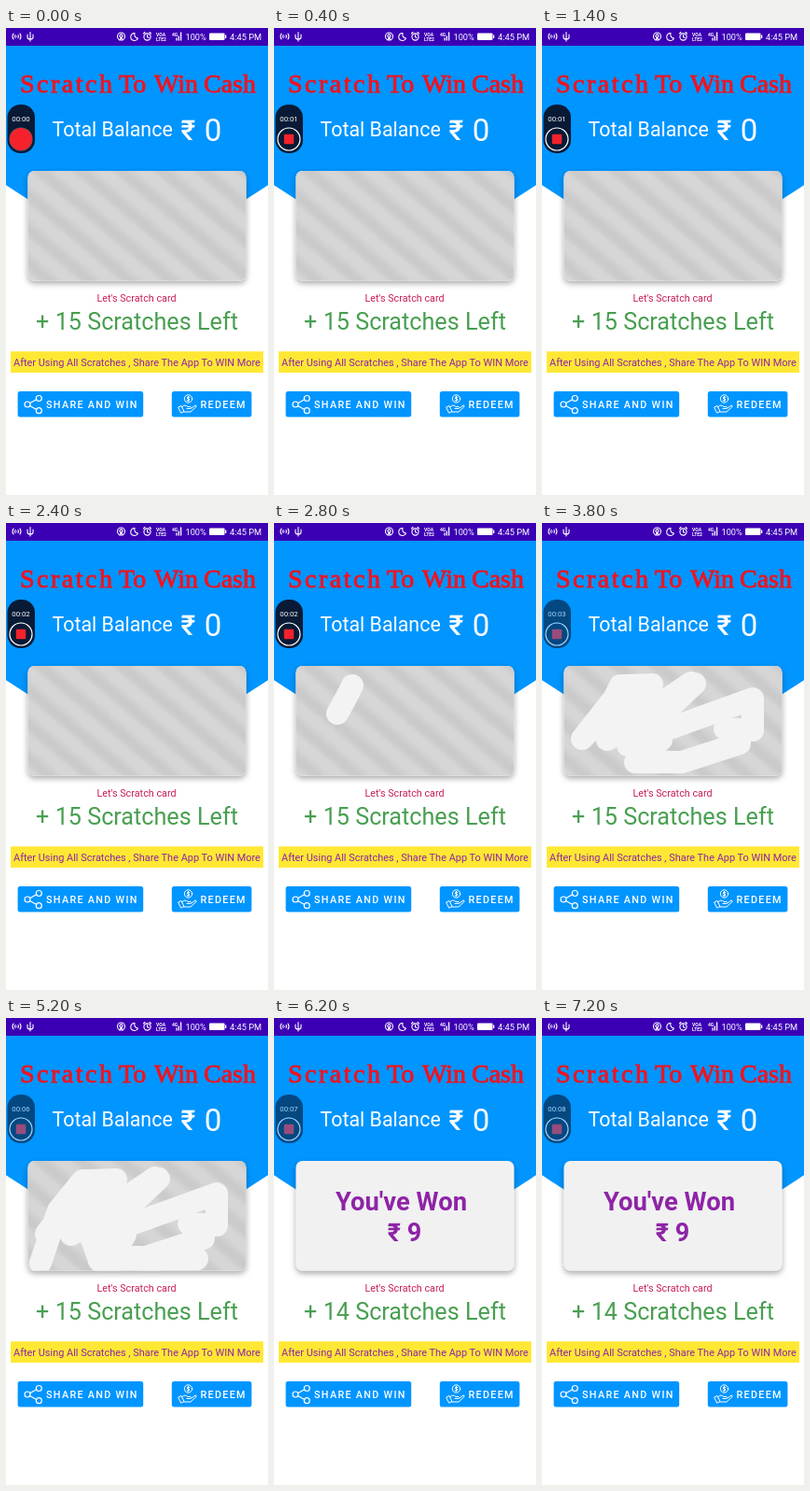
An HTML page that plays this animation: 281 px wide and 500 px high, repeating every 8 s.

```html
<!DOCTYPE html>
<html lang="en">
<head>
<meta charset="utf-8">
<style>
  html, body { margin: 0; width: 100%; height: 100%; overflow: hidden; background: #fff; }
  svg { display: block; width: 100vw; height: 100vh; font-family: Roboto, "Noto Sans", sans-serif; }
  .line { fill: none; stroke: #fff; stroke-linecap: round; stroke-linejoin: round; }
  .mid { text-anchor: middle; }
  .title { font: 28px "Liberation Serif", serif; fill: #f3121d; stroke: #f3121d; stroke-width: .8; }
  .button { font-size: 10.8px; font-weight: 500; letter-spacing: 1.3px; fill: #fff; }
</style>
</head>
<body>
<svg viewBox="0 0 281 500">
  <defs>
    <linearGradient id="sheen" x2="0" y2="1">
      <stop offset="0" stop-color="#d6d6d6"/>
      <stop offset=".3" stop-color="#d6d6d6"/>
      <stop offset=".6" stop-color="#cacaca"/>
      <stop offset=".8" stop-color="#cbcbcb"/>
      <stop offset="1" stop-color="#d6d6d6"/>
    </linearGradient>
    <pattern id="silver" width="40" height="28" patternUnits="userSpaceOnUse" patternTransform="translate(23 153) rotate(40)">
      <rect width="40" height="28" fill="url(#sheen)"/>
    </pattern>
    <clipPath id="cardClip"><rect x="23.500" y="153" width="234" height="117.500" rx="7"/></clipPath>
    <filter id="shadow" x="-10%" y="-10%" width="120%" height="130%">
      <feDropShadow dx="0" dy="3" stdDeviation="3" flood-opacity=".34"/>
    </filter>
  </defs>

  <rect width="281" height="500" fill="#fff"/>
  <path d="M0 19H281V168.300L140.500 259L0 168.300Z" fill="#0095ff"/>
  <rect width="281" height="19" fill="#3c00b4"/>

  <!-- status bar -->
  <g class="line" stroke-width="1.100">
    <path d="M8 6q-2 3 0 6M15 6q2 3 0 6M10 7.500q-1 1.500 0 3M13 7.500q1 1.500 0 3M11.500 9v.1"/>
    <path d="M26 4.500V14M23 7v3q0 2 3 2t3-2V7"/>
    <circle cx="123.500" cy="9" r="4"/><circle cx="123.500" cy="8.500" r="1.600"/><path d="M122 13l1.500-3 1.500 3"/>
    <path d="M138 5.500a4 4 0 1 0 3.500 5.500a4 4 0 0 1-3.500-5.500Z"/>
    <circle cx="151.500" cy="9.500" r="3.600"/><path d="M151.500 7.500v2l1.500 1M147.500 6l1.500-1.500M155.500 6L154 4.500"/>
    <path d="M183 13v-2M185.300 13V9M187.600 13V5" stroke-width="1.300"/>
  </g>
  <g fill="#fff">
    <g font-size="5" font-weight="700"><text x="161" y="8.500">VOA</text><text x="161" y="13.500">LTE2</text><text x="178" y="8.500">4G</text></g>
    <text x="192.500" y="12.700" font-size="9.200">100%</text>
    <rect x="218" y="5.500" width="16.500" height="7.500" rx="1"/><rect x="235" y="7.500" width="1.300" height="3.500"/>
    <text x="240" y="12.700" font-size="9.250">4:45 PM</text>
  </g>

  <!-- header -->
  <text class="title" y="68.500"><tspan x="15" letter-spacing="2.500">Scratch</tspan> <tspan x="121">To</tspan> <tspan x="159">Win</tspan> <tspan x="212">Cash</tspan></text>
  <g fill="#fff">
    <text x="49.500" y="116" font-size="21.400">Total Balance</text>
    <text x="187.500" y="120" font-size="30" font-weight="500">₹</text>
    <text x="212.700" y="120.500" font-size="33">0</text>
  </g>

  <!-- scratch card -->
  <rect x="23.500" y="153" width="234" height="117.500" rx="7" fill="#f1f1f2" filter="url(#shadow)"/>
  <g id="cover" clip-path="url(#cardClip)">
    <rect x="23" y="153" width="235" height="118" fill="url(#silver)"/>
    <polyline id="scratch" class="line" style="stroke:#f3f3f3;stroke-width:24"/>
  </g>
  <g id="prize" class="mid" fill="#8e24a6" font-weight="700">
    <text x="136.500" y="206" font-size="27.400">You've Won</text>
    <text x="140" y="239" font-size="27">₹ 9</text>
  </g>

  <text class="mid" x="140" y="293" font-size="10.800" fill="#c81e5b">Let's Scratch card</text>
  <text class="mid" id="left" x="140.500" y="323" font-size="25.200" fill="#489f50"></text>
  <rect x="5" y="346.300" width="271" height="22.700" fill="#ffe834"/>
  <text x="8" y="361.500" font-size="10.950" fill="#8e24a6">After Using All Scratches , Share The App To WIN More</text>

  <!-- buttons -->
  <g fill="#0095ff">
    <rect x="12.600" y="389" width="134.600" height="27.600" rx="2.500"/>
    <rect x="177.800" y="389" width="85.600" height="27.600" rx="2.500"/>
  </g>
  <g class="line" stroke-width="1.200">
    <path d="M25.500 401.800l7.200-4M25.500 404.500l7.200 4"/>
    <circle cx="23" cy="403" r="3"/><circle cx="35.300" cy="396.500" r="3"/><circle cx="35.300" cy="409.700" r="3"/>
  </g>
  <g class="line" stroke-width="1">
    <circle cx="195.500" cy="397" r="4.200"/>
    <path d="M197 395.500q-1.500-1-2.500 0t1 1.500t1 1.800t-2.500 0M195.500 394.300v5.400"/>
    <path d="M185 406l3-1.500 3 6-3 1.500ZM189 405.500q3-3 6 0h3q1.500 1 0 2h-4M199 407l4-3q1.500 0 1 1.500l-6 5.500h-7"/>
  </g>
  <g class="button"><text x="43" y="407">SHARE AND WIN</text><text x="208.500" y="407">REDEEM</text></g>

  <!-- recorder -->
  <g id="recorder">
    <rect x="1.500" y="82" width="29.500" height="52" rx="14" fill="#081a35"/>
    <text class="mid" id="clock" x="16" y="99.500" font-size="7.800" fill="#fff"></text>
    <circle id="ring" cx="16" cy="119" r="12" class="line" stroke-width="1.200"/>
    <rect id="stop" fill="#f5222b"/>
  </g>
</svg>
<script>
const LOOP = 8000;
const $ = id => document.getElementById(id);
const set = (el, attrs) => Object.entries(attrs).forEach(([k, v]) => el.setAttribute(k, v));

const strokePath = [
  [84, 174], [78, 186], [68, 204], [43, 231], [88, 174], [118, 173], [70, 232],
  [160, 171], [92, 238], [164, 172], [98, 234], [226, 188], [226, 222], [196, 220],
  [212, 236], [150, 256], [100, 256], [128, 232],
  [110, 260], [205, 258], [100, 260], [92, 236], [82, 174], [56, 206], [37, 262]
];
// [start time, value] lists; each value holds until the next start
const scratched = [[0, 0], [2600, 2], [2800, 3], [3000, 5], [3400, 8], [3600, 12], [3800, 18], [4200, 21], [5200, 25]];
const seconds = [[0, 0], [400, 1], [1600, 2], [3000, 3], [4200, 5], [5200, 6], [6200, 7], [7000, 8]];
const stopSize = [[0, 24], [200, 16], [400, 10.5]];
const recorderAlpha = [[0, 1], [3400, .8], [3600, .62]];
const REVEAL = 6200;

const at = (steps, t) => steps.filter(([start]) => start <= t).pop()[1];

function draw(t) {
  const won = t >= REVEAL;
  $('cover').style.display = won ? 'none' : '';
  $('prize').style.display = won ? '' : 'none';
  $('left').textContent = `+ ${won ? 14 : 15} Scratches Left`;
  set($('scratch'), { points: strokePath.slice(0, at(scratched, t)).join(' ') });

  const size = at(stopSize, t);
  set($('stop'), {
    x: 16 - size / 2, y: 119 - size / 2, width: size, height: size,
    rx: size > 11 ? size / 2 : 1
  });
  set($('ring'), { opacity: size < 20 ? 1 : .3 });
  $('clock').textContent = `00:0${at(seconds, t)}`;
  set($('recorder'), { opacity: at(recorderAlpha, t) });
}

const start = performance.now();
function tick() {
  draw((performance.now() - start) % LOOP);
  requestAnimationFrame(tick);
}
tick();
</script>
</body>
</html>
```
